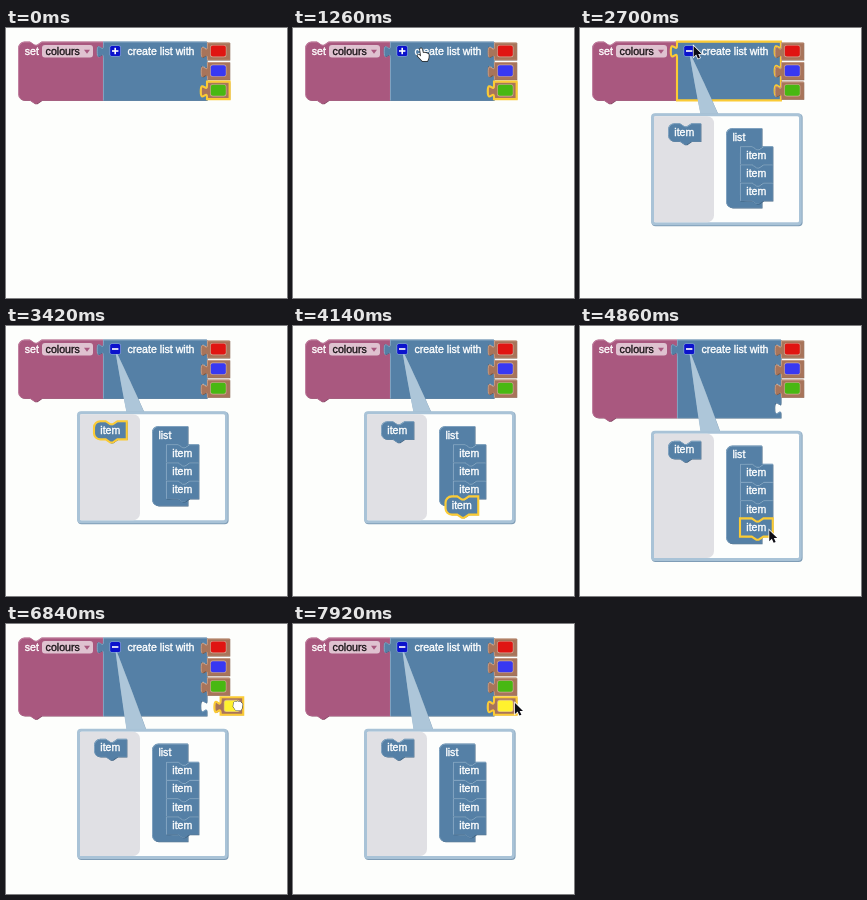
An HTML page with a canvas for the animation above (8 s loop, 281 by 270 pixels).

```html
<!DOCTYPE html>
<html lang="en">
<head>
<meta charset="utf-8">
<title>Adding an item to a list block</title>
<style>
html, body { margin: 0; width: 100%; height: 100%; overflow: hidden; background: #fdfefc; }
canvas { display: block; width: 281px; height: 270px; }
</style>
</head>
<body>
<canvas id="stage" width="281" height="270"></canvas>
<script>
const ctx = document.getElementById('stage').getContext('2d');
const LOOP = 8000, UNIT = 0.78, ROW = 19.6, ITEM = 18.2, TOP = 13.6, SLOT = 201;
const OPEN = 2160, GRAB = 3420, DROP = 4500, PICK = 6060, PLUG = 7200;
const FONT = '10.6px "Liberation Sans", Arial, sans-serif';

const PINK = ['#a9587f', '#c98caa', '#82405f'];
const BLUE = ['#5580a6', '#8fafc9', '#3c6080'];
const BROWN = ['#a8745a', '#cda58f', '#7b523d'];
const COLOURS = ['#e01512', '#3838f2', '#48b812', '#fff22e'];

// Path pieces in block units
const START = 'M0,8 A8,8 0 0 1 8,0';
const NOTCH = 'H15 l6,4 3,0 6,-4';
const STUD = 'H30 l-6,4 -3,0 -6,-4';
const TAB = 'v5 c0,10 -8,-8 -8,7.5 s8,-2.5 8,7.5';
const CLOSE = 'H8 a8,8 0 0 1 -8,-8 Z';
const LEFT_TAB = 'V20 c0,-10 -8,8 -8,-7.5 s8,2.5 8,-7.5 Z';
const rowUnits = ROW / UNIT, itemUnits = ITEM / UNIT;

const setPath = n => `${START} ${NOTCH} H108.7 ${TAB} V${n * rowUnits} ${STUD} ${CLOSE}`;
const itemBody = `${NOTCH} H42 V${itemUnits} ${STUD}`;
const itemPath = `${START} ${itemBody} ${CLOSE}`;
const stackedPath = `M0,0 ${itemBody} H0 Z`;
const colourPath = `M0,0 H29 V22.5 H0 ${LEFT_TAB}`;

function createPath(n) {
  let d = 'M0,0 H133.2';
  for (let i = 0; i < n; i++) d += ` V${i * rowUnits} ${TAB}`;
  return `${d} V${n * rowUnits} H0 ${LEFT_TAB}`;
}

function containerPath(n) {
  const inner = n * itemUnits - 16;
  return `${START} H46 V23.3 H48 l-6,4 -3,0 -6,-4 H26 a8,8 0 0 0 -8,8 v${inner}` +
    ` a8,8 0 0 0 8,8 H46 v9 ${CLOSE}`;
}

function block(d, x, y, [fill, light, dark], selected) {
  const path = new Path2D(d);
  ctx.save();
  ctx.translate(x, y);
  ctx.scale(UNIT, UNIT);
  ctx.save();
  ctx.translate(0.8, 0.8);
  ctx.fillStyle = dark;
  ctx.fill(path);
  ctx.restore();
  ctx.fillStyle = fill;
  ctx.fill(path);
  ctx.save();
  ctx.clip(path);
  ctx.translate(0.5, 0.5);
  ctx.strokeStyle = light;
  ctx.lineWidth = 1.1;
  ctx.stroke(path);
  ctx.restore();
  if (selected) {
    ctx.strokeStyle = '#fbcb35';
    ctx.lineWidth = 2.7;
    ctx.stroke(path);
  }
  ctx.restore();
}

function label(s, x, y, color = '#fff') {
  ctx.font = FONT;
  ctx.fillStyle = ctx.strokeStyle = color;
  ctx.lineWidth = 0.35;
  ctx.fillText(s, x, y);
  ctx.strokeText(s, x, y);
}

function box(x, y, w, h, r, fill) {
  ctx.beginPath();
  ctx.roundRect(x, y, w, h, r);
  ctx.fillStyle = fill;
  ctx.fill();
}

function item(x, y, selected, path = itemPath) {
  block(path, x, y, BLUE, selected);
  label('item', x + 6.3, y + 12.4);
}

function colour(i, x, y, selected) {
  block(colourPath, x, y, BROWN, selected);
  box(x + 3.2, y + 2.6, 16.2, 12.2, 2.5, '#d0ab98');
  box(x + 3.8, y + 3.2, 15, 11, 2, COLOURS[i]);
}

function icon(open) {
  box(103.6, 17.4, 11.2, 11.2, 2, '#8aa5e8');
  box(104.2, 18, 10, 10, 1.5, '#0b12cc');
  ctx.fillStyle = '#fff';
  ctx.fillRect(106, 22.2, 6.4, 1.6);
  if (!open) ctx.fillRect(108.4, 19.8, 1.6, 6.4);
}

// Tapering tail from the middle of the bubble to the icon
function tail(cx, cy, half, fill) {
  const tx = 109, ty = 23, dx = tx - cx, dy = ty - cy, len = Math.hypot(dx, dy);
  const nx = -dy / len * half, ny = dx / len * half;
  const bend = s => [cx + s * nx + dx / 4, cy + s * ny + dy / 4];
  ctx.beginPath();
  ctx.moveTo(cx + nx, cy + ny);
  ctx.bezierCurveTo(...bend(1), tx, ty, tx, ty);
  ctx.bezierCurveTo(tx, ty, ...bend(-1), cx - nx, cy - ny);
  ctx.fillStyle = fill;
  ctx.fill();
}

function bubble(n, t) {
  const dy = (n - 3) * ROW, top = 85.2 + dy, h = 112.4 + (n - 3) * ITEM;
  const cx = 146.4, cy = top + h / 2, half = (151 + h) / 20;
  tail(cx + 0.7, cy + 0.7, half, '#7f9db6');
  tail(cx, cy, half, '#adc6d9');
  box(71.6, top + 0.6, 151, h, 4, '#7f9db6');
  box(71, top, 150.8, h - 0.4, 4, '#a9c3d7');
  box(74, top + 3, 145, h - 6.4, 1.5, '#fdfefd');
  box(74, top + 3, 60, h - 6.4, [1, 7, 7, 1], '#e0e0e4');
  item(88, 95.2 + dy);
  block(containerPath(n), 146, 100 + dy, BLUE);
  label('list', 152.4, 112.6 + dy);
  for (let i = 0; i < n; i++) {
    item(160, 118.2 + dy + i * ITEM, i === 3 && t < PICK, stackedPath);
  }
}

// Eased position along timed points [time, x, y]
function along(keys, t) {
  const i = keys.findIndex(k => k[0] > t);
  if (i < 0) return keys[keys.length - 1].slice(1);
  if (i === 0) return keys[0].slice(1);
  const a = keys[i - 1], b = keys[i];
  const p = (t - a[0]) / (b[0] - a[0]), e = p * p * (3 - 2 * p);
  return [a[1] + (b[1] - a[1]) * e, a[2] + (b[2] - a[2]) * e];
}

const pointer = [[700, 290, 170], [1260, 127, 20], [1440, 127, 20], [1900, 113.6, 18],
  [2800, 113.6, 18], [3330, 104, 100]];
const leave = [[4680, 170, 205], [5400, 292, 200]];
const itemDrag = [[GRAB, 88, 95.2], [4140, 152.5, 170.4], [DROP, 157, 173.5]];
const yellowDrag = [[PICK, 290, 250], [6780, 214.6, 73.2], [6900, 214.6, 73.2], [PLUG, 204, 73.6]];

const ARROW = new Path2D('M0,0 V11 L2.6,8.6 L4.4,12.6 L6.4,11.7 L4.6,7.9 H8 Z');
const HAND = new Path2D('M0,1 Q1,-.6 2,1 L3,5 Q4,4 5,5 Q6,4.4 7,5.6 Q8.6,5 8.8,7 L8.6,10 L7.4,13 H2.4 L-2.4,8 Q-2.6,6.4 -.8,7 L1,8.4 Z');
const FIST = new Path2D('M0,2 Q1,0 2.5,1 Q4,-.2 5.2,1 Q7,.2 7.6,2 Q9.2,2 9,4 L8.4,7.4 L7.4,9.6 H2.2 L-.4,6 Z');

function cursorShape(shape, x, y, fill, edge, width) {
  ctx.save();
  ctx.translate(x, y);
  ctx.strokeStyle = edge;
  ctx.lineWidth = width;
  ctx.stroke(shape);
  ctx.fillStyle = fill;
  ctx.fill(shape);
  ctx.restore();
}
const arrow = (x, y) => cursorShape(ARROW, x, y, '#0c0c14', '#fff', 1.4);
const hand = (x, y) => cursorShape(HAND, x, y, '#fff', '#222', 1.4);
const fist = (x, y) => cursorShape(FIST, x, y, '#fff', '#333', 1);

function cursor(t) {
  if (t > 700 && t < 1700) hand(...along(pointer, t));
  else if (t >= 1700 && t < GRAB) arrow(...along(pointer, t));
  else if (t >= 4680 && t < 5400) arrow(...along(leave, t));
  else if (t >= PLUG) arrow(222, 79);
}

function draw(t) {
  const open = t >= OPEN, n = t < DROP ? 3 : 4;
  ctx.fillStyle = '#fdfefc';
  ctx.fillRect(0, 0, 281, 270);

  block(setPath(n), 12.2, TOP, PINK);
  label('set', 18.8, 26.8);
  box(36, 17, 51, 12.6, 3, '#dfc2d0');
  label('colours', 39.6, 26.8, '#1c1519');
  ctx.beginPath();
  ctx.moveTo(78, 21.8);
  ctx.lineTo(84, 21.8);
  ctx.lineTo(81, 25.8);
  ctx.fillStyle = '#a9587f';
  ctx.fill();

  const listSelected = open && t < GRAB;
  block(createPath(n), 97, TOP, BLUE, listSelected);
  label('create list with', 121.4, 26.8);
  for (let i = 0; i < 3; i++) colour(i, SLOT, TOP + 0.8 + i * ROW, i === 2 && !open);
  if (t >= PLUG) colour(3, SLOT, TOP + 0.8 + 3 * ROW, true);

  if (open) bubble(n, t);
  icon(open);

  if (t >= GRAB && t < DROP) item(...along(itemDrag, t), true);
  if (t >= PICK && t < PLUG) {
    const [x, y] = along(yellowDrag, t);
    colour(3, x, y, true);
    fist(x + 13, y + 3.6);
  }
  cursor(t);
}

function tick() {
  draw(performance.now() % LOOP);
  requestAnimationFrame(tick);
}
tick();
</script>
</body>
</html>
```
